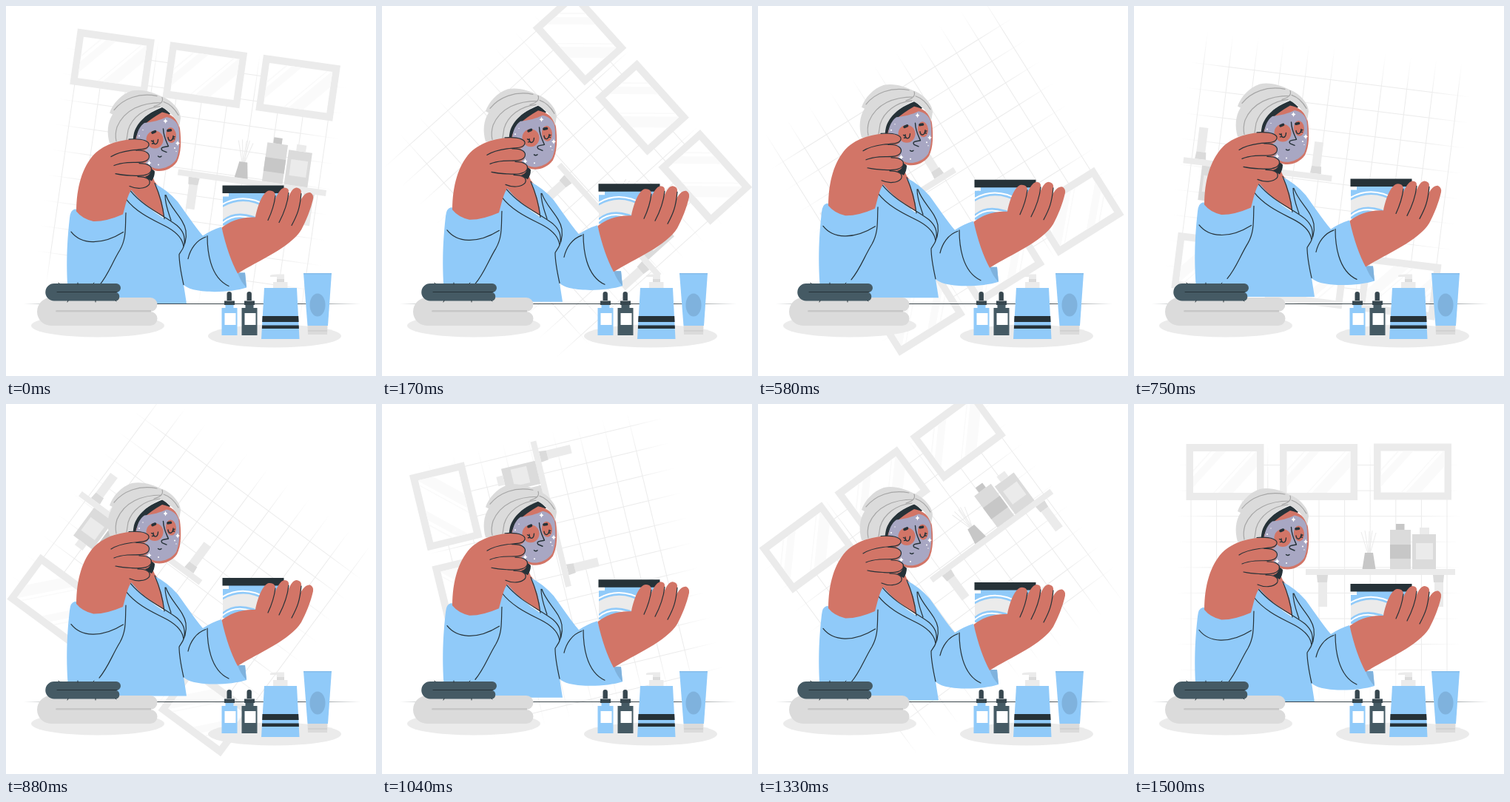
Write an HTML page that moves like this. It is 500x500 px and loops after 1540 ms.

```html
<!DOCTYPE html>
<html lang="en">
<head>
<meta charset="utf-8">
<title>Skin care</title>
<style>
@property --p { syntax: "<number>"; inherits: true; initial-value: 0 }
html, body { margin: 0; height: 100%; overflow: hidden; background: #fff }
svg { display: block; width: 100vw; height: 100vh; animation: turn 1540ms -5ms infinite }

/* --p is the share of one turn, advanced in 37 held poses */
@keyframes turn {
  0% { --p: .0225; animation-timing-function: steps(14) }
  37.838% { --p: .411; animation-timing-function: steps(7) }
  56.757% { --p: .6012; animation-timing-function: steps(8) }
  78.378% { --p: .823; animation-timing-function: steps(7) }
  97.297%, 100% { --p: 1 }
}
#room { transform-origin: 249.8px 229px; transform: rotate(calc(var(--p) * 1turn)) }
#woman { transform: translateY(calc(max(-1 * var(--p), var(--p) - 1) * 20px)) }

.g1 { fill: #ebebeb }
.g2 { fill: #dbdbdb }
.g3 { fill: #c7c7c7 }
.blue { fill: #90caf9 }
.shade { fill: #7fb2dd }
.skin { fill: #d27567 }
.dark { fill: #263238 }
.slate { fill: #455a64 }
.white { fill: #fff }
.ink { fill: none; stroke: #263238; stroke-width: 1.2; stroke-linecap: round; stroke-linejoin: round }
.brow { stroke-width: 3.6 }
.face { stroke-width: 1.4 }
.fold { fill: none; stroke: #a6a6a6; stroke-width: 1.2; stroke-linecap: round }
</style>
</head>
<body>
<svg viewBox="0 0 500 500">
  <defs>
    <linearGradient id="fade">
      <stop offset="0" stop-color="#ebebeb" stop-opacity="0"/>
      <stop offset=".15" stop-color="#ebebeb"/>
      <stop offset=".85" stop-color="#ebebeb"/>
      <stop offset="1" stop-color="#ebebeb" stop-opacity="0"/>
    </linearGradient>
    <linearGradient id="fadeX" href="#fade" gradientUnits="userSpaceOnUse" x1="58" y1="0" x2="441" y2="0"/>
    <linearGradient id="fadeY" href="#fade" gradientUnits="userSpaceOnUse" x1="0" y1="54" x2="0" y2="404"/>
    <linearGradient id="edge" gradientUnits="userSpaceOnUse" x1="24" y1="0" x2="479" y2="0">
      <stop offset="0" stop-color="#263238" stop-opacity="0"/>
      <stop offset=".2" stop-color="#263238" stop-opacity=".9"/>
      <stop offset=".8" stop-color="#263238" stop-opacity=".9"/>
      <stop offset="1" stop-color="#263238" stop-opacity="0"/>
    </linearGradient>
    <clipPath id="pane"><path d="M-43-28h86v56h-86z"/></clipPath>
    <clipPath id="jarBody"><path d="M293 258h75v39h-75z"/></clipPath>
    <g id="mirror">
      <path class="g1" d="M-52.5-38h105v76h-105z"/>
      <path class="white" d="M-43-28h86v56h-86z"/>
      <g clip-path="url(#pane)">
        <path transform="rotate(-47.7)" fill="#fafafa" d="M-70-28H70v10H-70zM-70-34H70v2H-70zM-70 12H70v15H-70zM-70 7H70v1.500H-70z"/>
      </g>
    </g>
    <g id="bracket">
      <path class="g1" d="M2 10h12v33H2z"/>
      <path class="g2" d="M0 0h15l-1 10H1z"/>
    </g>
    <g id="dropper">
      <path d="M5.500 403h11v6h-11zM.5 408h21v37H.5z"/>
      <path class="white" d="M4.500 415h15v16h-15z"/>
      <path fill="#37474f" d="M4 398.500h14v5.500H4zM7.500 398v-9q0-3 3.200-3t3.200 3v9z"/>
    </g>
    <path id="spark" class="white" d="M0-3.500Q.5-.5 3 0Q.5.5 0 3.500Q-.5.5-3 0Q-.5-.5 0-3.500z"/>
  </defs>

  <g id="room">
    <path fill="none" stroke="url(#fadeY)" d="M77 54v350m34.600-350v350m34.600-350v350m34.600-350v350m34.600-350v350m34.600-350v350m34.600-350v350m34.600-350v350m34.600-350v350m34.600-350v350m34.600-350v350"/>
    <path fill="none" stroke="url(#fadeX)" d="M58 82.500h383m-383 34.600h383m-383 34.600h383m-383 34.600h383m-383 34.600h383m-383 34.600h383m-383 34.600h383m-383 34.600h383m-383 34.600h383"/>
    <use href="#mirror" x="123" y="92"/>
    <use href="#mirror" x="249.500" y="92"/>
    <use href="#mirror" x="376.500" y="91.500"/>
    <use href="#bracket" x="247" y="231"/>
    <use href="#bracket" x="404" y="231"/>
    <path class="g1" d="M232 223h202v8H232z"/>
    <path fill="none" stroke="#ebebeb" d="M316 202l-9-29M317 202l-5-31M317 202l1-30M318 202l4-31M319 202l8-28"/>
    <path class="g3" d="M312 201h11l3.500 22h-18z"/>
    <path class="g2" d="M346 170h28v53h-28z"/>
    <path class="g3" d="M346 190h28v19h-28zM354 162h11.500v8H354z"/>
    <path class="g2" d="M376 176h32v47h-32z"/>
    <path class="g1" d="M381 188h23v22h-23zM386 167h13v9h-13z"/>
  </g>

  <ellipse class="g1" cx="124" cy="432" rx="90" ry="15.500"/>
  <ellipse class="g1" cx="363" cy="446" rx="90" ry="15.500"/>

  <g id="woman">
    <!-- neck and chest -->
    <path class="skin" d="M190 212L201 238C212 250 218 268 216 288L165 252L180 235z"/>
    <path class="dark" d="M193 216L201 224Q201 231 197 237L187 232z"/>

    <!-- head -->
    <path class="dark" d="M170 182C169 166 180 150 212 137L222 146L180 182z"/>
    <path class="skin" d="M175 181C177 168 190 156 211 144C222 146 232 152 235 166C237 182 237 199 231 211C224 221 212 225 202 223C188 219 177 205 175 181z"/>
    <path fill="#a8a7c3" d="M176 181C177 170 181 163 187 158.500C199 157 208 155 217 150.500C225 152 232 157 233.500 166C235 182 235 196 230 208C223 218 211 221.500 202 220C188 217 178 203 176 181z"/>
    <path class="g2" d="M140 186C136 172 137 158 144 147L140 145C144 133 155 120 170 115C184 112 199 117 211 123C225 128 236 142 236 152L234 164C230 152 222 143 210 137C192 144 177 158 173 172Q171 181 172 186z"/>
    <path class="fold" d="M146 141C158 126 180 117 204 122M210 131C184 131 160 140 150 164Q147 174 149 183M208 136C187 138 170 151 165 168L163 181M211 124Q214 132 200 136M213 130Q225 134 233 148"/>

    <ellipse class="skin" cx="201" cy="181" rx="11.500" ry="12"/>
    <ellipse class="skin" cx="223" cy="175" rx="7" ry="10.500" transform="rotate(-6 223 175)"/>
    <path class="ink brow" d="M198 171.500l3.500-1.500M219 168.800l3.500-.6"/>
    <path class="ink face" d="M199 182C199 189 205 189 205.500 181M199 184l-2.500-1.500M200 186l-2.500.5M219 178C220 184 225 184 226 176M226 178l2-1M225 180l2.500 0M212.500 166.500C213 178 217 184 219.500 190L214 191Q208 192 211 195.500L217 198M205.500 203.500Q208 205.500 210 203.500"/>
    <use href="#spark" x="215.500" y="156"/>
    <use href="#spark" x="232" y="186"/>
    <use href="#spark" x="193.500" y="212.500"/>
    <g class="white">
      <circle cx="228" cy="192.500" r="1"/><circle cx="230" cy="197" r=".7"/>
      <circle cx="206" cy="215" r="1"/><circle cx="187" cy="200" r=".8"/>
      <circle cx="185" cy="168" r=".7"/><circle cx="180" cy="176" r="1"/>
    </g>

    <!-- robe -->
    <path class="blue" d="M93 275Q87 276 86 287C83 315 80 350 85 402.500H244L240 377C250 389 300 389 325 381L323 361H313L291 299Q278 303 266 311C255 298 243 280 232 265Q218 249 200 240Q213 262 214 288Q188 272 168 248L157 262V280z"/>
    <path class="shade" d="M313 361L323 361L325 381Q317 373 313 361z"/>
    <path class="ink" d="M88 305.500C101 322 128 325 158.500 306M162 280C161 300 163 314 154 330C143 348 138 364 126 378M162 261C178 282 205 292 219 300C233 308 239 316 240 326M168 250C187 273 213 283 231 297C240 305 242 312 241 322M201 240C208 256 212 272 214 288M215 256C215 269 220 281 223 290M216 256C222 274 240 287 243 304C245 318 240 328 234 336Q234 350 240 377M246 342C249 329 257 317 270 312.500M272 311C272 330 275 367 301 379"/>

    <!-- jar -->
    <path class="blue" d="M301 252h71v7h-71zM293 258h75v39h-75z"/>
    <g clip-path="url(#jarBody)">
      <path class="g1" d="M290 274Q320 255 352 274V292Q312 270 290 292z"/>
      <path fill="none" stroke="#fff" stroke-width="2" d="M290 270Q320 251 354 271M290 296Q312 274 348 295"/>
    </g>
    <path class="dark" d="M292.500 243h83v10.500h-83z"/>

    <!-- right hand -->
    <path class="skin" d="M291.500 300C302 292 316 285 337 286C340 270 347 252 355 250Q363 249 364 256L363 263C367 254 371 247 376 246Q383 246 382 253L381 260C385 251 388 246 393 246Q400 247 399 254L398 263C402 256 406 252 411 252.500Q416 255 415 261C412 275 405 292 399 303C384 327 342 344 313 362Q300 338 291.500 300z"/>
    <path class="ink" d="M364 257Q362 273 354 290M382 253Q380 272 369 293M399 254C397 274 394 282 386 297"/>

    <!-- left hand -->
    <path class="skin" d="M95 278C95 246 103 218 119 201C135 185 160 180 180 180.500Q194 183 193 189Q192 194 187 195.500Q195 201 193 207Q191 212 186 213Q197 217 196 223.500Q194 230 188 231Q196 236 194 241Q188 248 171 246C163 258 162 269 158 282Q135 292 118 291.500Q103 288 95 278z"/>
    <path class="ink" d="M166 180.500C187 179 194 184 193 188.500C191 195.500 179 194 169 195.500Q151 198 142 204M176 195.500C191 195 195 201 193 206C189 214 176 211 164 212Q153 213 146 216M180 213C195 213 198 219 196 223.500C192 231 179 230 169 229.500Q157 229 148 227M178 231C192 231 196 236 193.500 241.500C188 248 176 248 167 244"/>
  </g>

  <path d="M24 402h455v1H24z" fill="url(#edge)"/>

  <!-- towels -->
  <path class="g2" d="M61 394H195a9.500 9.500 0 0 1 0 19a9.500 9.500 0 0 1 0 19H61a19 19 0 0 1 0-38z"/>
  <path class="g3" d="M68 411H196v2.500H68q-2-1.200 0-2.500z"/>
  <path class="slate" d="M65 375H149a6 6 0 0 1 0 12a6 6 0 0 1 0 11.500H65a11.700 11.700 0 0 1 0-23.500z"/>
  <path class="ink" style="stroke-width:1" d="M69 386.500H150M72 375l-1-1M97 376v-2M118 375l1-1M84 398l-1 2M121 398v2M148 398l1 1"/>

  <!-- bottles -->
  <use href="#dropper" x="291" class="blue"/>
  <use href="#dropper" x="318" class="slate"/>
  <path class="blue" d="M349 381h44l3.500 69h-51.500z"/>
  <path class="dark" d="M346.500 419h48.700l.4 8h-49.400zM346 431.500h49.700l.2 4.500h-50z"/>
  <path class="g2" d="M366 368h10v6h-10z"/>
  <path class="g1" d="M361 373h19.500v8H361zM357 364q3-1.500 9-1.500h10v6.500h-10v-3h-9z"/>
  <path class="blue" d="M402 361h38l-5 71h-27.500z"/>
  <path class="shade" d="M402 361h38l-.2 1.500h-37.600z" opacity=".5"/>
  <ellipse class="shade" cx="421" cy="404" rx="10.500" ry="15.500"/>
  <path class="g2" d="M407.500 432h27l-.5 12h-26z"/>
  <path class="g3" d="M408 438.500h26v1h-26z"/>
</svg>
</body>
</html>
```
